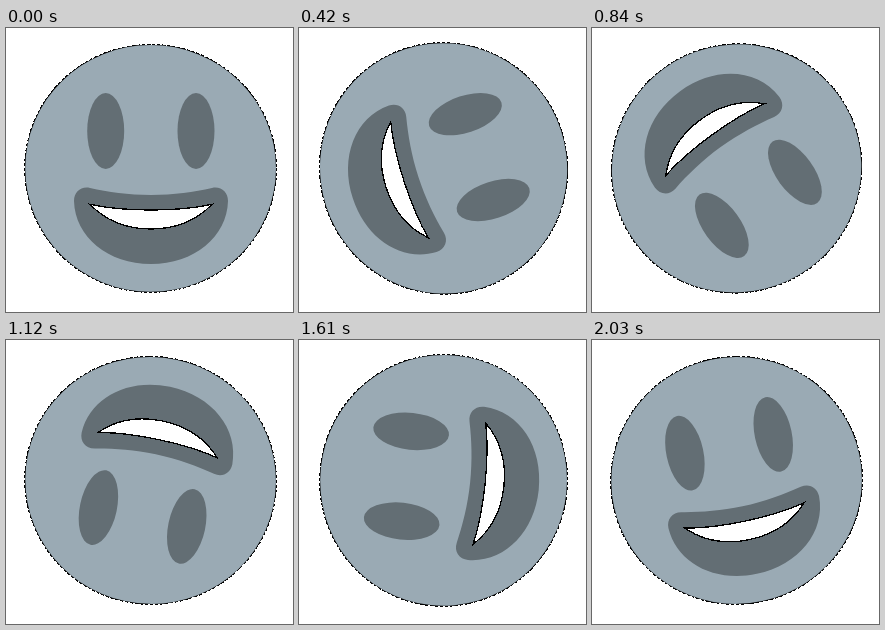
These frames come from a looping animation (287 by 284 pixels, 2100 ms). An HTML page:

```html
<!DOCTYPE html>
<html lang="en">
<head>
<meta charset="utf-8">
<title>Rolling smiley</title>
<style>
  html, body { margin: 0; width: 100%; height: 100%; overflow: hidden; background: #fff; }
  svg { display: block; }
  .crisp { shape-rendering: crispEdges; }
  .rough { stroke: #000; stroke-width: 1.1; stroke-dasharray: 3 2; }
  .skin { fill: #9aaab4; }
  .dark { fill: #636e74; }
</style>
</head>
<body>
<svg width="287" height="284" viewBox="0 0 287 284">
  <g id="face">
    <!-- Hard-edged black backing shows through the soft edges above it -->
    <ellipse class="crisp rough" cx="144.6" cy="140.4" rx="125.9" ry="123.9"/>
    <ellipse class="skin" cx="144.6" cy="140.4" rx="125.4" ry="123.4"/>
    <ellipse class="dark" cx="99.7" cy="103" rx="18.5" ry="38"/>
    <ellipse class="dark" cx="190" cy="103" rx="18.5" ry="38"/>
    <path class="dark" d="M84 160C102 164 122 167 145 167S188 164 206 160C215 158 222 164 222 173C221 209 188 236 145 236S69 209 68 173C68 164 75 158 84 160Z"/>
    <path class="crisp" fill="#fff" stroke="#000" stroke-width="1.3" d="M84 176.3C104 180.8 124 182 145 182S186 180.8 206 176.3C191 192 170 201 145 201S99 192 84 176.3Z"/>
  </g>
</svg>
<script>
  const STEP_MS = 70;
  const STEPS = 30;
  const face = document.getElementById('face');
  const start = performance.now();

  function draw(now) {
    const step = Math.floor(Math.max(0, now - start) / STEP_MS) % STEPS;
    face.setAttribute('transform', `rotate(${step * 360 / STEPS} 144.6 140.4)`);
    requestAnimationFrame(draw);
  }
  draw(start);
</script>
</body>
</html>
```
